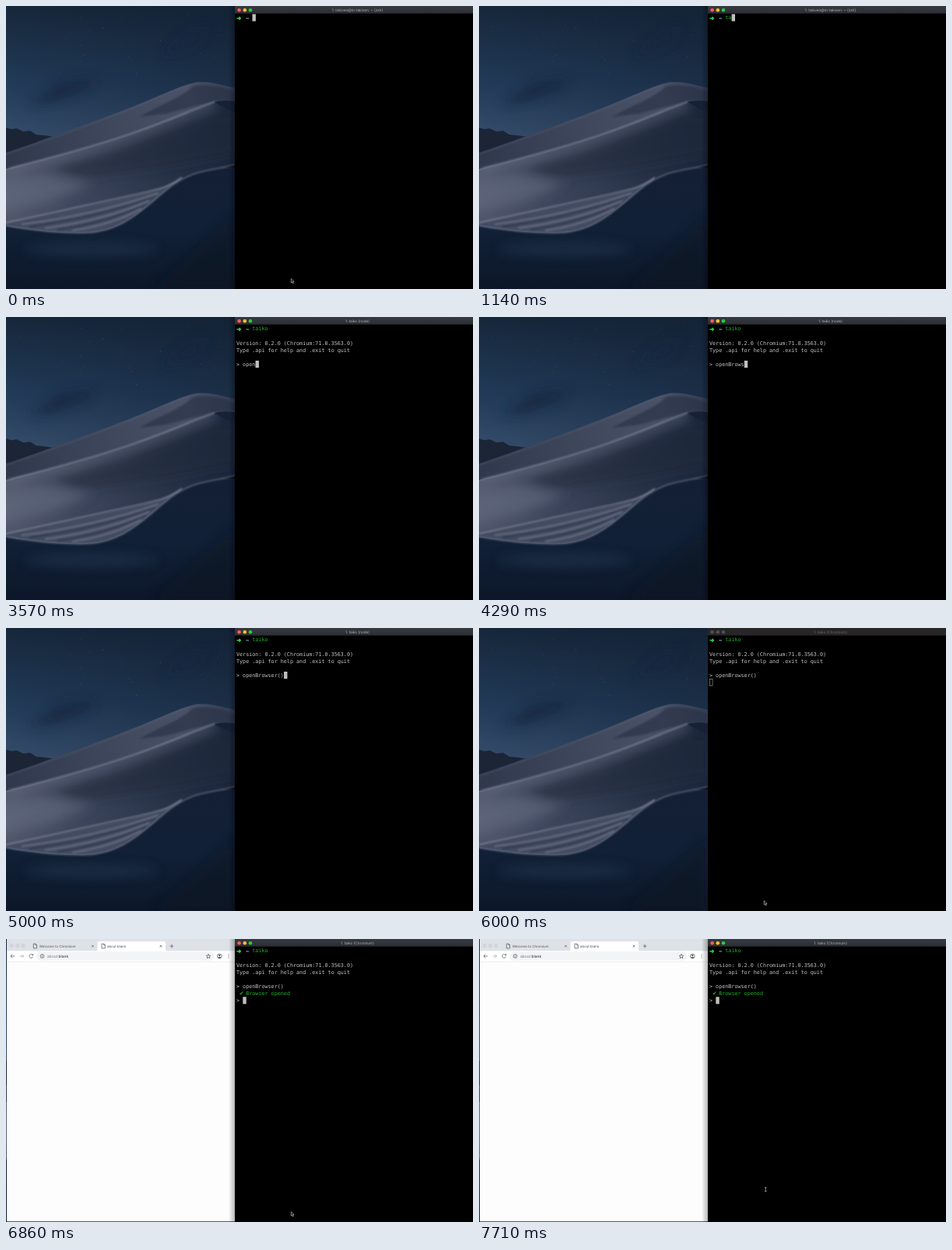
An HTML page for the animation above (8000 ms loop, 600 by 363 pixels).

```html
<!DOCTYPE html>
<html lang="en">
<head>
<meta charset="utf-8">
<title>Terminal session</title>
<style>
  html, body { margin: 0; width: 100%; height: 100%; overflow: hidden; background: #000; }
  svg { display: block; width: 600px; height: 363px; }
  text { text-rendering: geometricPrecision; white-space: pre; }
  .mono { font: 6.74px "DejaVu Sans Mono", monospace; fill: #c4c4c4; }
  .glyph { font: 7.2px "DejaVu Sans", sans-serif; }
  .title { font: 4.7px Inter, sans-serif; text-anchor: middle; fill: #b0b2b5; }
  .tab { font: 4.35px Inter, sans-serif; fill: #50545a; }
  .url { font: 4.9px Inter, sans-serif; fill: #777b80; }
  .line { fill: none; stroke: #5f6368; stroke-width: .8; }
  .dark { fill: #25282c; }
  .dim { fill: #6b6b6d; }
  .green { fill: #1fb32a; }
</style>
</head>
<body>
<svg viewBox="0 0 600 363">
  <defs>
    <linearGradient id="sky" x2="0" y2="1">
      <stop stop-color="#16273b"/><stop offset=".5" stop-color="#213a57"/>
      <stop offset=".82" stop-color="#334b69"/><stop offset="1" stop-color="#435773"/>
    </linearGradient>
    <linearGradient id="dusk">
      <stop stop-color="#101b2c" stop-opacity="0"/><stop offset="1" stop-color="#101b2c" stop-opacity=".4"/>
    </linearGradient>
    <linearGradient id="far" gradientUnits="userSpaceOnUse" x1="0" y1="200" x2="294" y2="100">
      <stop stop-color="#2f384c"/><stop offset=".45" stop-color="#3e475c"/>
      <stop offset=".8" stop-color="#4a5268"/><stop offset="1" stop-color="#333d52"/>
    </linearGradient>
    <linearGradient id="near" gradientUnits="userSpaceOnUse" x1="0" y1="240" x2="290" y2="165">
      <stop stop-color="#4f566b"/><stop offset=".35" stop-color="#3a4359"/>
      <stop offset=".7" stop-color="#283247"/><stop offset="1" stop-color="#1b263b"/>
    </linearGradient>
    <linearGradient id="ground" gradientUnits="userSpaceOnUse" x1="0" y1="215" x2="0" y2="363">
      <stop stop-color="#131f35"/><stop offset=".5" stop-color="#112036"/><stop offset="1" stop-color="#0c1729"/>
    </linearGradient>
    <linearGradient id="shade">
      <stop stop-opacity="0"/><stop offset="1" stop-opacity=".28"/>
    </linearGradient>
    <linearGradient id="bar" x2="0" y2="1">
      <stop stop-color="#373a41"/><stop offset="1" stop-color="#2b2e34"/>
    </linearGradient>
    <filter id="soft" filterUnits="userSpaceOnUse" x="-40" y="0" width="380" height="363"><feGaussianBlur stdDeviation="7"/></filter>
    <filter id="haze" filterUnits="userSpaceOnUse" x="-40" y="0" width="380" height="363"><feGaussianBlur stdDeviation="1.2"/></filter>
    <path id="crest" d="M0 209C60 194 110 181 160 164S235 135 268 123" fill="none"/>
    <path id="foot" d="M0 282C40 289 75 292 105 291C140 290 166 270 185 254C202 240 215 226 240 216C258 210 278 208 294 204" fill="none"/>
    <clipPath id="dune"><path d="M0 209C60 194 110 181 160 164S235 135 268 123L294 134V204C278 208 258 210 240 216C215 226 202 240 185 254C166 270 140 290 105 291C75 292 40 289 0 282Z"/></clipPath>
    <path id="page" d="M0 0h2.8l1.5 1.5v4.2h-4.3zM2.8 0v1.6h1.5" class="line"/>
    <path id="cross" d="M-1.3-1.3l2.6 2.6m0-2.6l-2.6 2.6" class="line"/>
    <path id="plus" d="M-2.2 0h4.4M0-2.2v4.4" class="line"/>
  </defs>

  <g id="wallpaper">
    <rect width="294" height="195" fill="url(#sky)"/>
    <rect width="294" height="195" fill="url(#dusk)"/>
    <g filter="url(#soft)" fill="#17273f" opacity=".75">
      <path d="M28 126L70 97L116 92L108 106L62 124Z"/>
      <path d="M198 64L230 36L262 24L244 52Z"/>
    </g>
    <g id="stars" fill="#8ea3bb"></g>
    <path d="M0 156L7 158L14 157L22 161L31 160L39 165L50 166L64 168L40 182L0 190Z" fill="#1b2535"/>
    <path d="M0 188C45 173 100 153 150 134S225 101 246 98C262 96 278 102 294 105V150L0 240Z" fill="url(#far)"/>
    <path d="M240 103C228 116 200 126 172 142L206 138L268 122L294 121V110Q262 98 240 103" fill="#272f43" opacity=".6" filter="url(#haze)"/>
    <path d="M0 190C45 175 100 155 150 136S225 102 248 98" fill="none" stroke="#636b82" opacity=".6" filter="url(#haze)"/>
    <path d="M0 207H294V363H0Z" fill="url(#ground)"/>
    <ellipse cx="110" cy="312" rx="85" ry="9" fill="#213650" opacity=".6" filter="url(#soft)"/>
    <path d="M190 363L294 270V363Z" fill="#0b1222" opacity=".6" filter="url(#soft)"/>
    <g clip-path="url(#dune)">
      <rect y="110" width="294" height="190" fill="url(#near)"/>
      <g filter="url(#soft)">
        <path d="M60 209L150 184L268 136L294 140V190L200 208L90 222Z" fill="#1d273b" opacity=".55"/>
        <path d="M-20 222L50 216L110 228L60 250L-20 268Z" fill="#6b7087" opacity=".5"/>
        <use href="#crest" stroke="#7d8398" stroke-width="11" opacity=".45"/>
      </g>
      <path d="M0 279C70 264 130 252 170 242S205 231 226 220L210 250L140 296H0Z" fill="#434b60"/>
      <g fill="none" filter="url(#haze)">
        <path d="M0 278C70 263 130 250 170 241S210 230 226 220" stroke="#7b8095" stroke-width="1.6"/>
        <path d="M20 280Q110 269 196 240M50 285Q125 275 184 250M85 288Q135 281 174 260" stroke="#656c82" stroke-width="2"/>
        <path d="M30 283Q115 272 192 244M66 287Q130 278 180 254" stroke="#2e384d" stroke-width="1.8"/>
      </g>
    </g>
    <g filter="url(#haze)">
      <use href="#foot" stroke="#6c738a" stroke-width="1.5" opacity=".8"/>
      <use href="#crest" stroke="#969bae" stroke-width="1.8" opacity=".65"/>
    </g>
    <path d="M268 123Q280 120 294 122V135Q280 131 268 123" fill="#162136"/>
  </g>

  <g id="browser" data-on="6290 8000">
    <rect x="1" width="294" height="362.3" fill="#fdfdfd"/>
    <rect x="1" width="294" height="15.5" fill="#dee1e6"/>
    <g fill="#d3d6da" stroke="#c6c9ce" stroke-width=".5">
      <circle cx="7.2" cy="8.5" r="2.2"/><circle cx="14.6" cy="8.5" r="2.2"/><circle cx="22" cy="8.5" r="2.2"/>
    </g>
    <path id="activeTab" d="M27 15.5Q29.5 15.5 29.5 13V5.5Q29.5 3 32 3H114.5Q117 3 117 5.5V13Q117 15.5 119.5 15.5Z" fill="#fff"/>
    <rect x="1" y="15.5" width="294" height="13.5" fill="#fff"/>
    <path d="M1 29.2H294" stroke="#dcdee1" stroke-width=".6"/>
    <rect x="39" y="16.6" width="228" height="11" rx="5.5" fill="#f1f3f4"/>
    <path d="M11 22H6m2.3-2.3L6 22l2.3 2.3" class="line"/>
    <path d="M17.7 22h5m-2.3-2.3l2.3 2.3l-2.3 2.3" class="line" opacity=".5"/>
    <path d="M260 19.3l.8 1.9l2 .1l-1.5 1.4l.5 2l-1.8-1.1l-1.8 1.1l.5-2l-1.5-1.4l2-.1z" class="line"/>
    <circle cx="274.3" cy="22" r="2.9" class="line"/>
    <circle cx="274.3" cy="21.2" r="1.1" fill="#4b4f54"/><path d="M272.2 23.8q2.1-1.6 4.2 0q-2.1 2-4.2 0" fill="#4b4f54"/>
    <g fill="#5f6368"><circle cx="286" cy="20" r=".6"/><circle cx="286" cy="22" r=".6"/><circle cx="286" cy="24" r=".6"/></g>
    <use href="#cross" x="111.5" y="9.2"/>

    <g data-on="6290 6710">
      <text class="tab" x="42.5" y="10.8">Untitled</text>
      <use href="#plus" x="125.5" y="9.2"/>
      <path d="M30 19.8l4.4 4.4m0-4.4l-4.4 4.4" class="line"/>
      <circle cx="46.3" cy="22" r="2.5" fill="#74787d"/>
      <text class="url" x="53" y="23.7">Chromium</text>
      <path d="M80.5 19.5v5" stroke="#b5b8bb" stroke-width=".5"/>
      <text class="url" x="84" y="23.7">chrome://<tspan class="dark">welcome</tspan></text>
    </g>
    <g data-on="6710 8000">
      <use href="#page" x="35.3" y="6.2"/>
      <text class="tab" x="42.8" y="10.8">Welcome to Chromium</text>
      <use href="#page" x="123" y="6.2"/>
      <text class="tab" x="130" y="10.8">about:blank</text>
      <use href="#cross" x="199" y="9.2"/>
      <use href="#plus" x="213" y="9.2"/>
      <path d="M34.3 20.5a2.4 2.4 0 1 0 .3 2.2M34.8 19v1.8h-1.8" class="line"/>
      <circle cx="46.5" cy="22" r="2.4" class="line"/><path d="M46.5 21.7v1.6m0-2.7v-.6" class="line"/>
      <text class="url" x="53" y="23.7">about:<tspan class="dark">blank</tspan></text>
    </g>
  </g>

  <g id="terminal">
    <rect x="286" width="8" height="363" fill="url(#shade)" data-on="0 5430, 6860 8000"/>
    <rect x="294" width="306" height="363"/>
    <g data-on="0 5430, 6860 8000">
      <rect x="294" width="306" height="9.6" fill="url(#bar)"/>
      <circle cx="299.6" cy="5.2" r="2.3" fill="#fc5b57"/><circle cx="306.8" cy="5.2" r="2.3" fill="#fdbc2e"/><circle cx="314" cy="5.2" r="2.3" fill="#29c83f"/>
    </g>
    <g data-on="5430 6860">
      <rect x="294" width="306" height="9.6" fill="#262629"/>
      <g fill="#505052"><circle cx="299.6" cy="5.2" r="2.3"/><circle cx="306.8" cy="5.2" r="2.3"/><circle cx="314" cy="5.2" r="2.3"/></g>
    </g>
    <g class="title">
      <text x="451.5" y="7" data-on="0 2000">1. takiven@in-takiven: ~ (zsh)</text>
      <text x="451.5" y="7" data-on="2000 5290">1. taiko (node)</text>
      <text x="451.5" y="7" data-on="5290 5430, 6860 8000">1. taiko (Chromium)</text>
      <text x="451.5" y="7" class="dim" data-on="5430 6860">1. taiko (Chromium)</text>
    </g>
    <g class="mono">
      <text class="glyph" x="296.3" y="17.5" fill="#2fe04a" stroke="#2fe04a" stroke-width=".5">➜</text>
      <text x="308.2" y="17.6" fill="#8cc4c4" stroke="#8cc4c4" stroke-width=".25">~</text>
      <text x="316.3" y="17.3" class="green" id="command"></text>
      <g data-on="2140 8000">
        <text x="296" y="35.5">Version: 0.2.0 (Chromium:71.0.3563.0)</text>
        <text x="296" y="44.6">Type .api for help and .exit to quit</text>
      </g>
      <text x="296" y="62.9" data-on="2290 8000">&gt;</text>
      <text x="304.1" y="62.9" id="call"></text>
      <g data-on="6860 8000">
        <text class="glyph green" x="299.8" y="72.3">✔</text>
        <text class="green" x="308.2" y="72">Browser opened</text>
        <text x="296" y="81.1">&gt;</text>
      </g>
    </g>
    <rect id="cursor" width="4.4" height="9.1" data-on="0 140, 710 2570, 3000 5430, 6860 8000" fill="#c0c0c0"/>
    <rect x="296.4" y="65.4" width="3.6" height="8.6" fill="none" stroke="#929292" stroke-width=".7" data-on="5430 6860"/>
  </g>

  <path d="M366.3 349.8v5.2l1.2-1.1l.9 2l1-.4l-.9-2h1.6z" stroke="#ddd" stroke-width=".6" data-on="0 1000, 5430 7000"/>
  <path id="beam" d="M367-2.5q1.3 0 1.3 1q0-1 1.3-1M368.3-2v4.5M367 3q1.3 0 1.3-1q0 1 1.3 1" fill="none" stroke="#bbb" stroke-width=".7" data-on="7000 8000"/>
</svg>
<script>
const LOOP = 8000, CHAR = 4.057, ROW = 9.12;
const byId = id => document.getElementById(id);
const command = { node: byId("command"), text: "taiko", keys: [1000, 1140, 1290, 1570, 1710] };
const call = {
  node: byId("call"), text: "openBrowser()",
  keys: [3000, 3140, 3290, 3570, 3710, 3860, 4000, 4140, 4290, 4570, 4710, 4860, 5000]
};

const timed = [...document.querySelectorAll("[data-on]")].map(node => ({
  node, spans: node.dataset.on.split(",").map(span => span.trim().split(" ").map(Number))
}));

// A few faint stars in the upper sky
let seed = 7;
const random = () => (seed = seed * 16807 % 2147483647) / 2147483647;
for (let i = 0; i < 26; i++) {
  const star = document.createElementNS("http://www.w3.org/2000/svg", "circle");
  const values = { cx: random() * 290, cy: random() * 95, r: .4, opacity: .25 + random() * .5 };
  for (const name in values) star.setAttribute(name, values[name]);
  byId("stars").append(star);
}

function type({ node, text, keys }, t) {
  const count = keys.filter(key => key <= t).length;
  node.textContent = text.slice(0, count);
  return count;
}

function cursorCell(t, commandLength, callLength) {
  if (t < 1860) return [5 + commandLength, 0];
  if (t < 2140) return [0, 1];
  if (t < 2290) return [0, 4];
  if (t < 5140) return [2 + callLength, 5];
  return t < 6860 ? [0, 6] : [2, 7];
}

function draw(now) {
  const t = now % LOOP;
  for (const { node, spans } of timed)
    node.style.display = spans.some(([from, to]) => t >= from && t < to) ? "" : "none";
  const [column, row] = cursorCell(t, type(command, t), type(call, t));
  byId("cursor").setAttribute("x", 296.2 + column * CHAR);
  byId("cursor").setAttribute("y", 10.4 + row * ROW);
  byId("activeTab").setAttribute("transform", `translate(${t < 6710 ? 0 : 88})`);
  const move = Math.min(1, Math.max(0, (t - 7000) / 290));
  byId("beam").setAttribute("transform", `translate(0 ${352 - 31 * move})`);
  requestAnimationFrame(() => draw(performance.now() - start));
}

const start = performance.now();
draw(0);
</script>
</body>
</html>
```
